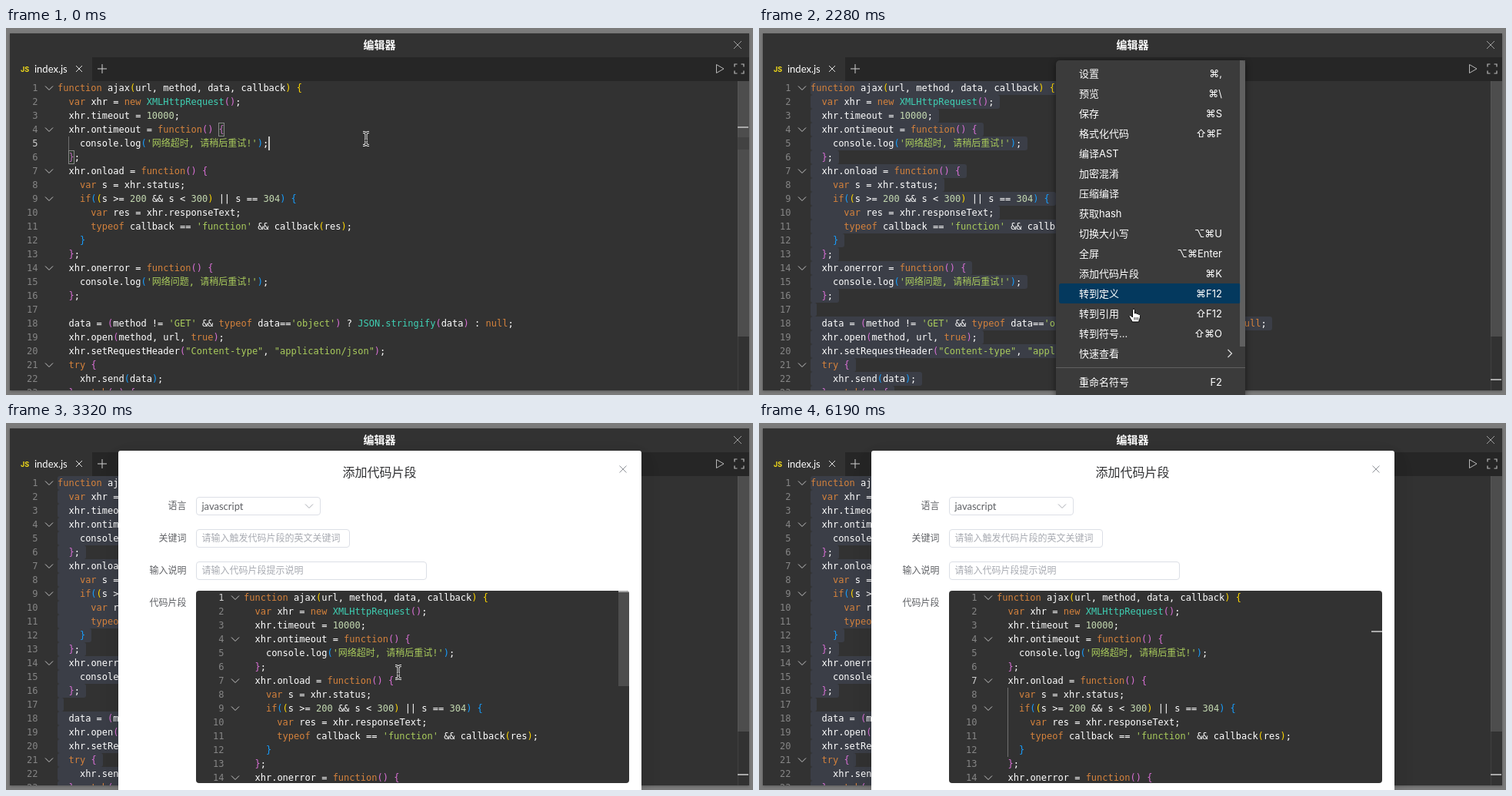
An HTML page for the animation above (6210 ms loop, 971 px wide and 477 px high).

```html
<!DOCTYPE html>
<html lang="zh">
<head>
<meta charset="utf-8">
<title>编辑器</title>
<style>
html, body { margin: 0; width: 100%; height: 100%; overflow: hidden; background: #7b7b7b; }
#stage { position: relative; width: 971px; height: 477px; overflow: hidden; background: #7b7b7b;
  font: 13px Lato, "Noto Sans CJK SC", "Noto Sans CJK", sans-serif; color: #fff; }
#stage div, #stage svg { position: absolute; box-sizing: border-box; }
svg { overflow: visible; fill: none; }
#win { left: 5px; top: 7px; width: 961px; height: 464px; background: #323232; box-shadow: 0 1px 3px rgba(0,0,0,.3); }
#strip { left: 0; top: 31px; width: 961px; height: 31px; background: #262626; }
#tab { left: 0; top: 0; width: 107px; height: 31px; background: #323232; line-height: 30px; }
.title { left: 0; width: 100%; text-align: center; }
.editor { overflow: hidden; background: #323232; font: 12px/18px "DejaVu Sans Mono", "Noto Sans CJK SC", "Noto Sans CJK", monospace; }
.body { left: 0; top: 0; width: 100%; height: 500px; }
.line { left: 62px; height: 18px; white-space: pre; }
.num { left: 0; width: 36.5px; text-align: right; color: #858585; }
.num.on { color: #d0d0d0; }
.sel { left: 62px; height: 18px; border-radius: 3px; }
.match { width: 8px; height: 18px; border: 1px solid #888; background: rgba(0,100,0,.1); }
.guide { width: 1px; background: #707070; }
.caret { width: 2px; height: 18px; background: #c8c8c6; }
.slider { background: rgba(121,121,121,.38); }
.mark { background: #a9a9a9; height: 2px; }
#menu { left: 386px; top: 42px; width: 246px; height: 460px; background: #3b3b3b; border-radius: 5px;
  box-shadow: 0 2px 8px rgba(0,0,0,.5); font: 13px/26px Inter, "Noto Sans CJK SC", "Noto Sans CJK", "DejaVu Sans", sans-serif; }
.item { left: 4px; width: 236px; height: 26px; border-radius: 3px; }
.item.on { background: #04395e; }
.item b, .item i { position: absolute; font-weight: 400; font-style: normal; white-space: nowrap; }
.item b { left: 26px; }
.item i { right: 24px; }
#dialog { left: 145.5px; top: 36px; width: 680px; height: 480px; background: #fff; border-radius: 3px;
  box-shadow: 0 12px 32px 4px rgba(0,0,0,.04), 0 8px 20px rgba(0,0,0,.08); }
.label { left: 0; width: 89px; text-align: right; font-size: 12px; line-height: 24px; color: #606266; }
.field { left: 101px; height: 24px; border: 1px solid #dcdfe6; border-radius: 4px; padding-left: 7px;
  font-size: 12px; line-height: 22px; color: #a8abb2; white-space: nowrap; }
.button { top: 445px; height: 26px; border-radius: 4px; }
</style>
</head>
<body>
<div id="stage">
  <div id="win">
    <div class="title" style="top:5px;font-size:14px;line-height:20px;font-weight:700">编辑器</div>
    <div id="strip">
      <div id="tab">
        <div style="left:14px;font:700 9px/31px Inter,sans-serif;color:#f5de19">JS</div>
        <div style="left:32px">index.js</div>
      </div>
    </div>
  </div>
</div>
<script>
const LOOP = 6210, CH = 7.224, ROW = 18;
const CODE = `function ajax(url, method, data, callback) {
  var xhr = new XMLHttpRequest();
  xhr.timeout = 10000;
  xhr.ontimeout = function() {
    console.log('网络超时, 请稍后重试!');
  };
  xhr.onload = function() {
    var s = xhr.status;
    if((s >= 200 && s < 300) || s == 304) {
      var res = xhr.responseText;
      typeof callback == 'function' && callback(res);
    }
  };
  xhr.onerror = function() {
    console.log('网络问题, 请稍后重试!');
  };

  data = (method != 'GET' && typeof data=='object') ? JSON.stringify(data) : null;
  xhr.open(method, url, true);
  xhr.setRequestHeader("Content-type", "application/json");
  try {
    xhr.send(data);
  } catch(e) {
    console.log(e);
  }
}
`.split('\n');
const FOLDS = [1, 4, 7, 9, 14, 21];
const DEPTH = ['#ffd700', '#da70d6', '#179fff'];
const TOKEN = /(['"].*?['"])|\b(function|var|new|if|typeof|null|true|try|catch)\b|(XMLHttpRequest|JSON\.stringify)|(\b\d+\b)|([(){}])|[^'"(){}\w]+|\w+/g;
const MENU = [['设置', '⌘,'], ['预览', '⌘\\'], ['保存', '⌘S'], ['格式化代码', '⇧⌘F'], ['编译AST'], ['加密混淆'],
  ['压缩编译'], ['获取hash'], ['切换大小写', '⌥⌘U'], ['全屏', '⌥⌘Enter'], ['添加代码片段', '⌘K'], ['转到定义', '⌘F12'],
  ['转到引用', '⇧F12'], ['转到符号...', '⇧⌘O'], ['快速查看'], ['重命名符号', 'F2']];

const stage = document.getElementById('stage');

function add(host, cls, box = {}, text = '') {
  const el = document.createElement('div');
  el.className = cls;
  for (const k in box) el.style[k] = typeof box[k] === 'number' ? box[k] + 'px' : box[k];
  el.textContent = text;
  host.append(el);
  return el;
}

// Line icon centred on x, y
function icon(host, x, y, d, color, width = 1) {
  host.insertAdjacentHTML('beforeend',
    `<svg width="1" height="1" style="left:${x}px;top:${y}px"><path d="${d}" stroke="${color}" stroke-width="${width}"/></svg>`);
  return host.lastElementChild;
}
const cross = r => `M${-r} ${-r}L${r} ${r}M${r} ${-r}L${-r} ${r}`;
const DOWN = 'M-5-2.5L0 2.5L5-2.5';
const show = (el, on) => { el.style.visibility = on ? 'inherit' : 'hidden'; };

function paint(el, text, state) {
  for (const m of text.matchAll(TOKEN)) {
    const span = document.createElement('span');
    span.textContent = m[0];
    let color = '#fff';
    if (m[1]) color = '#a9cb5c';
    else if (m[2]) color = '#d5823c';
    else if (m[3]) color = '#3fd0b4';
    else if (m[4]) color = '#c3d8b0';
    else if (m[5]) {
      if (m[5] === ')' || m[5] === '}') state.depth--;
      color = DEPTH[state.depth % 3];
      if (m[5] === '(' || m[5] === '{') state.depth++;
    }
    span.style.color = color;
    el.append(span);
  }
}

function makeEditor(host, left, top, width, height) {
  const root = add(host, 'editor', { left, top, width, height });
  const body = add(root, 'body');
  const ed = { root, body, nums: [], sels: [], folds: [] };
  const state = { depth: 0 };
  CODE.forEach((text, i) => {
    const y = i * ROW;
    const cjk = (text.match(/[\u4e00-\u9fff]/g) || []).length;
    ed.sels.push(add(body, 'sel', { top: y, width: (text.length - cjk + 1) * CH + cjk * 12 + 0.8 }));
    ed.nums.push(add(body, 'num', { top: y }, i + 1));
    paint(add(body, 'line', { top: y }), text, state);
  });
  FOLDS.forEach(n => ed.folds.push(icon(body, 50.5, n * ROW - 9, DOWN, '#c5c5c5')));
  return ed;
}

// Matching pair with its indent guide
function pair(ed, from, col, to) {
  const at = (n, c) => add(ed.body, 'match', { left: 61.5 + c * CH, top: (n - 1) * ROW });
  add(ed.body, 'guide', { left: 76, top: from * ROW, height: (to - from - 1) * ROW });
  return [at(from, col), at(to, 2), ed.body.lastElementChild.previousElementSibling.previousElementSibling];
}

// Window
const win = document.getElementById('win'), strip = document.getElementById('strip');
icon(win, 946, 15, cross(5), '#a0a0a0');
icon(strip, 90, 15, cross(4), '#e0e0e0');
icon(strip, 120, 15, 'M-6 0H6M0-6V6', '#d0d0d0');
icon(strip, 923, 15, 'M-4.5-5.5L5 0L-4.5 5.5Z', '#b8b8b8');
icon(strip, 948, 15, 'M-6-2.5V-6H-2.5M2.5-6H6V-2.5M6 2.5V6H2.5M-2.5 6H-6V2.5', '#b8b8b8', 1.2);

const main = makeEditor(win, 0, 62, 961, 402);
const mainPair = pair(main, 4, 29, 6);
const mainCaret = add(main.body, 'caret', { left: 335.5, top: 72 });
add(main.root, '', { left: 946, top: 0, width: 1, height: 402, background: 'rgba(127,127,127,.18)' });
add(main.root, 'slider', { left: 946, top: 0, width: 15, height: 332 });
const mainSpot = add(main.root, '', { left: 946, top: 73, width: 15, height: 16, background: 'rgba(40,40,40,.3)' });
const mainMark = add(main.root, 'mark', { left: 946, width: 14 });

// Context menu
const menu = add(stage, '');
menu.id = 'menu';
const items = MENU.map(([name, key = ''], i) => {
  const el = add(menu, 'item', { top: i < 15 ? 4 + i * 26 : 405 });
  const b = document.createElement('b'), k = document.createElement('i');
  b.textContent = name;
  k.textContent = key;
  el.append(b, k);
  return el;
});
icon(menu, 226, 381, 'M-2.5-5L2.5 0L-2.5 5', '#e0e0e0', 1.2);
add(menu, '', { left: 0, top: 399, width: 246, height: 1, background: '#606060' });
const menuBar = add(menu, '', { left: 239, top: 0, width: 6.5, height: 372, background: 'rgba(121,121,121,.6)' });

// Dialog
const dialog = add(stage, '');
dialog.id = 'dialog';
add(dialog, 'title', { top: 16, fontSize: 16, lineHeight: '24px', color: '#303133' }, '添加代码片段');
icon(dialog, 656, 24, cross(4.5), '#909399');
['语言', '关键词', '输入说明', '代码片段'].forEach((s, i) => add(dialog, 'label', { top: 60 + i * 42 }, s));
add(dialog, 'field', { top: 60, width: 162, fontSize: 13, color: '#606266' }, 'javascript');
icon(dialog, 248.5, 72, DOWN, '#a8abb2');
add(dialog, 'field', { top: 102, width: 200 }, '请输入触发代码片段的英文关键词');
add(dialog, 'field', { top: 144, width: 300 }, '请输入代码片段提示说明');
add(dialog, 'button', { left: 558, width: 46, border: '1px solid #dcdfe6' });
add(dialog, 'button', { left: 616, width: 46, background: '#409eff' });

const snip = makeEditor(dialog, 101.5, 182, 562.5, 250);
snip.root.style.borderRadius = '4px';
snip.sels.forEach(s => show(s, false));
const snipPair = pair(snip, 7, 26, 13);
const snipCaret = add(snip.body, 'caret', { left: 256, top: 108 });
const snipBar = add(snip.root, 'slider', { left: 549, width: 14, height: 124 });
const snipMark = add(snip.root, 'mark', { left: 549, width: 14 });
const snipSpots = [53, 107].map(top => add(snip.root, 'mark', { left: 549, top, width: 7, height: 9 }));

// Pointers, hot spot at 0,0
const BEAM = 'M-4-8.5Q0-8.5 0-6Q0-8.5 4-8.5M0-6V6M-4 8.5Q0 8.5 0 6Q0 8.5 4 8.5M-2 2H2';
const HAND = 'M-1.5 1.2C-1.5-.2 1.5-.2 1.5 1.2V6C3 5.2 4 5.6 4.2 6.6C5.4 6 6.4 6.5 6.6 7.5C8 7 8.8 8 8.6 9.5C8.5 12.5 7 14 6.8 17H-2C-2.5 14.5-4.5 12.5-5.6 10.4C-6.4 8.6-4.4 8-3.2 9.2L-1.5 11Z';
const ARROW = 'M0 0V14L3.3 11L5.5 16L8 15L5.8 10H10Z';
function pointer(inner) {
  stage.insertAdjacentHTML('beforeend', `<svg width="1" height="1" style="left:0;top:0">${inner}</svg>`);
  return stage.lastElementChild;
}
const pointers = {
  beam: pointer(`<path d="${BEAM}" stroke="#fff" stroke-width="3"/><path d="${BEAM}" stroke="#000" stroke-width="1.1"/>`),
  hand: pointer(`<path d="${HAND}" fill="#fff" stroke="#000"/><path d="M1 11V14.5M3.2 11V14.5M5.4 11V14.5" stroke="#000" stroke-width=".8"/>`),
  arrow: pointer(`<path d="${ARROW}" fill="#000" stroke="#fff"/>`)
};

// Motion tables: [time, value, ...]
const PATH = [[195, 468, 144], [360, 383, 144], [1670, 383, 144], [1780, 425, 148], [1840, 448, 200], [1980, 474, 338],
  [2170, 474, 338], [2280, 487, 365], [2370, 493, 372], [2490, 497, 366], [2640, 505, 345], [2790, 511, 324],
  [2849, 511, 324], [2850, 510, 324], [3750, 510, 324], [3920, 571, 332], [5140, 571, 332], [5240, 862, 322]];
const SCROLL = [[4360, 0], [4440, 22], [4460, 23], [4510, 52], [4580, 70], [4850, 70], [4930, 30], [5020, 0]];
const BLINK_MAIN = [[200, 1], [360, 0]];
const BLINK_SNIP = [[4440, 1], [4580, 0], [5140, 0], [5270, 1], [5540, 1], [5710, 0]];
const BAR = [[5170, 1], [5270, 0]];

function track(table, t) {
  const i = table.findIndex(k => k[0] > t);
  if (i === 0) return table[0].slice(1);
  if (i < 0) return table[table.length - 1].slice(1);
  const a = table[i - 1], b = table[i], u = (t - a[0]) / (b[0] - a[0]);
  return a.slice(1).map((v, n) => v + (b[n + 1] - v) * u);
}

// cubic-bezier(.25, .1, .25, 1)
function ease(x) {
  if (x <= 0) return 0;
  if (x >= 1) return 1;
  const bez = (a, b, s) => 3 * s * (1 - s) * (1 - s) * a + 3 * s * s * (1 - s) * b + s * s * s;
  let lo = 0, hi = 1;
  for (let i = 0; i < 24; i++) {
    const mid = (lo + hi) / 2;
    if (bez(.25, .25, mid) < x) lo = mid; else hi = mid;
  }
  return bez(.1, 1, lo);
}

function render(t) {
  const selected = t >= 570, menuOn = t >= 1400 && t < 3030, dialogOn = t >= 3030;
  const clicked = t >= 3980, blurred = t >= 6190;

  main.sels.forEach(s => {
    show(s, selected);
    s.style.background = t < 1400 ? '#264f78' : '#3b3e47';
  });
  main.nums.forEach((n, i) => n.classList.toggle('on', i === (selected ? CODE.length - 1 : 4)));
  mainPair.forEach(el => show(el, !selected));
  show(mainSpot, !selected);
  show(mainCaret, !selected);
  mainCaret.style.opacity = track(BLINK_MAIN, t)[0];
  mainMark.style.top = (selected ? 387 : 59) + 'px';

  show(menu, menuOn);
  show(menuBar, t >= 1460);
  const [hx, hy] = track(PATH, t - 30);
  const row = t >= 1690 && hx >= 390 ? Math.floor((hy - 46) / 26) : -1;
  items.forEach((el, i) => el.classList.toggle('on', i === row));

  show(dialog, dialogOn);
  const p = ease((t - 3005) / 300);
  dialog.style.opacity = p * p;
  dialog.style.transform = p < 1 ? `translateY(${-20 * (1 - p)}px)` : 'none';
  snip.folds.forEach(f => show(f, t >= 3230));
  snip.nums.forEach((n, i) => n.classList.toggle('on', i === (clicked ? 6 : 0)));
  snipPair.forEach((el, i) => show(el, clicked && (i === 2 || !blurred)));
  snipSpots.forEach(el => show(el, clicked && !blurred));
  show(snipCaret, clicked);
  snipCaret.style.opacity = track(BLINK_SNIP, t)[0];
  const scroll = Math.round(track(SCROLL, t)[0]);
  snip.body.style.top = -scroll + 'px';
  snipBar.style.top = scroll / 2 + 'px';
  snipBar.style.opacity = track(BAR, t)[0];
  snipMark.style.top = (clicked ? 52 : 0) + 'px';

  const [x, y] = track(PATH, t);
  const kind = t >= 5260 ? '' : menuOn && x >= 386 ? 'hand' : x > 809 ? 'arrow' : 'beam';
  for (const k in pointers) {
    show(pointers[k], k === kind);
    pointers[k].style.transform = `translate(${Math.round(x)}px,${Math.round(y)}px)`;
  }
}

const start = performance.now();
function tick(now) {
  render(Math.max(0, now - start) % LOOP);
  requestAnimationFrame(tick);
}
render(0);
requestAnimationFrame(tick);
</script>
</body>
</html>
```
